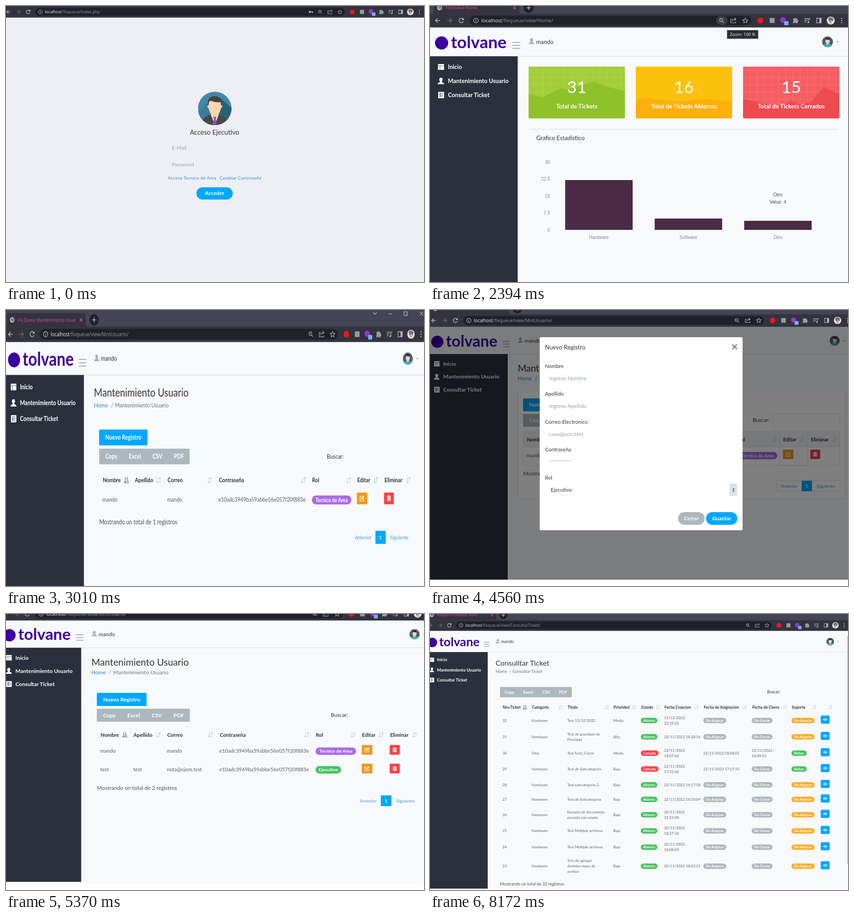
An HTML page for the animation above (9.12 s loop, 920 by 609 pixels).

```html
<!DOCTYPE html>
<html lang="es">
<head>
<meta charset="utf-8">
<title>Mesa de soporte</title>
<style>
html, body { margin: 0; width: 100%; height: 100%; overflow: hidden; background: #fff; }
#stage { position: relative; width: 920px; height: 609px; overflow: hidden; }
#film { display: block; font-family: Lato, "Open Sans", sans-serif; animation: cuts 9120ms step-end infinite; }
.ui { font-family: "Open Sans", "Noto Sans", sans-serif; }
.chart { font-family: "Liberation Sans", Arial, sans-serif; }
@keyframes cuts {
  0% { transform: translateY(0); }
  16.118% { transform: translateY(-609px); }
  33.004% { transform: translateY(-1218px); }
  50% { transform: translateY(-1827px); }
  58.881% { transform: translateY(-2436px); }
  74.013% { transform: translateY(-3045px); }
  100% { transform: translateY(-3045px); }
}
</style>
</head>
<body>
<div id="stage"><svg id="film" width="920" height="3654"></svg></div>
<script>
const BLUE = '#00a8ff', GREY = '#adb7be', GREEN = '#46c35f', RED = '#fa424a', ORANGE = '#fdad2a';
const INK = '#343434', SOFT = '#5d6063', PAGE = '#f7f9fb', LINE = '#d3dfe5';

// Drawing helpers; text is placed by the middle of its capitals.
const text = (x, y, s, size, fill = INK, weight = 400, anchor = 'start', extra = '') =>
  `<text x="${x}" y="${y + size * .36}" font-size="${size}" fill="${fill}" font-weight="${weight}" text-anchor="${anchor}" ${extra}>${s}</text>`;
const mid = (x, y, s, size, fill, weight) => text(x, y, s, size, fill, weight, 'middle');
const ui = (x, y, s, size, fill) => text(x, y, s, size, fill, 400, 'start', 'class="ui"');
const rect = (x, y, w, h, fill, r = 0, extra = '') =>
  `<rect x="${x}" y="${y}" width="${w}" height="${h}" fill="${fill}" rx="${r}" ${extra}/>`;
const box = (x, y, w, h) => rect(x, y, w, h, 'none', 1, `stroke="${LINE}"`);
const disc = (x, y, r, fill) => `<circle cx="${x}" cy="${y}" r="${r}" fill="${fill}"/>`;
const shape = (d, fill) => `<path d="${d}" fill="${fill}"/>`;
const stroke = (d, color, w = 1.5) => `<path d="${d}" fill="none" stroke="${color}" stroke-width="${w}"/>`;
const at = (x, y, inner, sx = 1, sy = sx) => `<g transform="translate(${x} ${y}) scale(${sx} ${sy})">${inner}</g>`;
const pill = (x, y, w, h, fill, s, size) =>
  rect(x, y - h / 2, w, h, fill, h / 2) + mid(x + w / 2, y, s, size, '#fff', 700);

// Icons
const person = (x, y, c, s = 1) => at(x, y, `<ellipse cy="-3" rx="3.6" ry="4.2" fill="${c}"/>` +
  shape('M-7 7Q-7 3.5 -2 2.5V0H2V2.5Q7 3.5 7 7Z', c), s);
const sort = (x, y, s = 1, active) => at(x, y, active
  ? stroke('M-3 -6V5.500M-5.500 3L-3 5.500L-.5 3M0 -5H3M0 -2H4M0 1.500H5M0 5H6', '#6c757d', 1.5)
  : stroke('M-2.500 -5.500V5.500M-5 3L-2.500 5.500L0 3M3 5.500V-5.500M.5 -3L3 -5.500L5.500 -3', '#c3cad0', 1.1), s);
const editBtn = (x, y) => rect(x, y - 11.5, 25, 23, '#f29824', 2) + at(x + 12.5, y,
  stroke('M2 -4H-5V5H4V1', '#fff', 1.2) + stroke('M-2 2L5 -4', '#fff', 2.4));
const trashBtn = (x, y) => rect(x, y - 11.5, 23.5, 23, RED, 2) + at(x + 11.7, y,
  shape('M-4 -2H4V5H-4ZM-5 -4H5V-2.8H-5ZM-2 -5.5H2V-4H-2Z', '#fff') + stroke('M-1.5 -.5V3.5M1.5 -.5V3.5', RED, .9));
const eyeBtn = y => rect(860, y - 9, 19.5, 18, BLUE, 2) + at(869.7, y,
  shape('M-4.5 0Q0 -5 4.5 0Q0 5 -4.5 0Z', '#fff') + disc(0, 0, 1.5, BLUE));
const bust = (x, y, r, bg, coat, hair, suit) => at(x, y, `<g clip-path="url(#round)">` + disc(0, 0, 37, bg) +
  (suit ? shape('M-15 -13L-40 12V40H0ZM12 -24L40 2V40H0Z', '#2b6278') + shape('M-15 -13L-40 12V40H0Z', '#3a7c99') : '') +
  shape('M-31 40Q-31 20 -9 13H9Q31 20 31 40Z', coat) + shape('M-9 13L0 36L9 13Z', suit ? '#f4f6f8' : coat) +
  rect(-6, 4, 12, 15, '#f2c499', 4) + disc(-13.5, -4, 3, '#fdd2a6') + disc(13.5, -4, 3, '#fdd2a6') +
  shape('M-13.5 -16H13.5V0Q10 16 0 17Q-10 16 -13.5 0Z', '#fdd7ad') +
  shape('M-15 -5Q-18 -25 -3 -27Q18 -28 15 -5L12.500 -14Q0 -12 -8 -18Q-13 -16 -13 -12Z', hair) +
  (suit ? shape('M-4 19H4L2 24L5 40H-5L-2 24Z', '#9b4fa5') : '') + '</g>', r / 37);

// Browser bar: left icons start at b, extensions start at r.
function browser(b, r, cy, sx, sy, path, title, opts = {}) {
  const c = '#b9bac3', dim = '#6b6c76', dark = '#20212a', bar = '#33343e';
  const tab = rect(-40, -70, 1300, 56, '#454556') + shape('M-14 -14.7Q-9 -14.7 -9 -20V-36Q-9 -41 -4 -41H174Q180 -41 180 -36V-20Q180 -14.7 186 -14.7Z', bar) +
    disc(4, -28, 5.5, c) + stroke('M1 -31L4 -29L2 -26M6 -32L7 -28L5 -25', bar, 1.3) +
    ui(17.5, -28, title, 9.2, '#f0439f') + stroke('M166 -31L172 -25M172 -31L166 -25', '#f0439f', 1.4) +
    disc(200, -28, 11, dark) + stroke('M195 -28H205M200 -33V-23', c);
  const left = stroke('M5 0H-5M0 -5L-5 0L0 5', c) + stroke('M21 0H31M26 -5L31 0L26 5', dim) +
    stroke('M56 -3A5 5 0 1 0 56.500 2', c) + shape('M57.500 -6V-1H52.500Z', c) +
    `<circle cx="84" r="5.2" fill="none" stroke="${c}" stroke-width="1.2"/>` + stroke('M84 -.5V3M84 -3V-1.6', c, 1.3) +
    ui(96, 0, `<tspan fill="#f1f1f4">localhost</tspan>/fixqueue/${path}`, 10.8, '#9697a1');
  const right = (opts.key ? disc(-113, 0, 2.8, c) + stroke('M-111 0H-104M-106 0V3', c, 2) : '') +
    (opts.lens ? rect(-97, -9.5, 25, 19, '#3d3e49', 9.5) : '') +
    `<circle cx="-86" cy="-1" r="3.6" fill="none" stroke="${c}" stroke-width="1.2"/>` + stroke('M-83 2L-80 5M-87.500 -1H-84.500', c, 1.2) +
    stroke('M-61 -3H-65V5H-54V2M-62 2Q-61 -3 -54 -3M-57 -6L-53.500 -3L-57 0', c, 1.1) +
    stroke('M-33 -5.500L-31.300 -1.800L-27.300 -1.400L-30.300 1.300L-29.400 5.200L-33 3.100L-36.600 5.200L-35.700 1.300L-38.700 -1.400L-34.700 -1.800Z', c, 1.1) +
    disc(0, 0, 6.5, '#f0171c') + rect(20.5, -5.5, 11, 11, '#9a9b9f') +
    disc(50, -1, 6.2, '#8f35d6') + rect(52.5, 1.5, 9.5, 9, '#78aef8', 1.5) +
    shape('M72 -4H75A2 2 0 0 1 79 -4H82V-.5A2 2 0 0 1 82 3.500V6H78A2 2 0 0 0 74.500 6H72V2A2 2 0 0 0 72 -1.500Z', '#9a9ba4') +
    stroke('M97 -4H106M97 -.5H104M97 3H101M107 4V-4H110', c, 1.3) + disc(105.5, 4, 1.8, c) +
    stroke('M124 -5H134V5H124Z', c, 1.3) + rect(130, -5, 4, 10, c) +
    disc(155, 0, 8.8, '#e9e7e5') + shape('M149 -4Q155 -11 161 -4L160 2L156 0L152 3Z', '#77736f') + disc(155, 4, 3, '#c9a693') +
    [-4.5, 0, 4.5].map(y => disc(179, y, 1.3, c)).join('');
  const x = b + 70 * sx, h = 21 * sy;
  return at(b, cy, tab + rect(-40, -14.7, 1300, 30, bar), sx, sy) +
    rect(x, cy - h / 2, r - 20 * sx - x, h, dark, h / 2) + at(b, cy, left, sx, sy) + at(r, cy, right, sx, sy);
}

// Shared site frame, in its own units; ax is the avatar's place.
function site(x, y, sx, sy, ax, body) {
  const items = ['Inicio', 'Mantenimiento Usuario', 'Consultar Ticket'];
  const icons = rect(17.5, 81.5, 13.5, 13, '#fff', 1) + stroke('M17.500 85.500H31M22 86V94.500', '#2b303c', .8) +
    person(24, 119, '#fff') + rect(18, 143, 13, 14, '#fff', 1) +
    stroke('M20 146.500H29M20 149.500H29M20 152.500H29M22.500 145V155', '#2b303c', .8);
  return at(x, y, rect(0, 0, 1300, 900, PAGE) + rect(0, 64, 1300, 1, '#cfdde4') +
    disc(25.5, 35, 14.5, '#3c00a0') + text(46, 33, 'tolvane', 37, '#3c00a0', 700) +
    stroke('M181 34H198.500M181 40.500H198.500M181 47H198.500', '#a5b1b9', 2) +
    person(223.5, 31, '#a3b1ba', .9) + text(233.5, 32.5, 'mando', 12.8) +
    bust(ax, 32.5, 12, '#4c6072', '#35b3bd', '#23262c') + shape(`M${ax + 20} 31.500H${ax + 26}L${ax + 23} 34.500Z`, '#a5adb5') +
    rect(0, 64.5, 193, 850, '#2b303c') + icons +
    items.map((s, i) => text(39.5, 88 + i * 31, s, 12.7, '#fff', 700)).join('') + body, sx, sy);
}

const exportBar = (x, y, w, h, centers, size) => rect(x, y, w, h, GREY, 2) +
  ['Copy', 'Excel', 'CSV', 'PDF'].map((s, i) => mid(centers[i], y + h / 2, s, size, '#fff', 700)).join('');

function login() {
  return rect(0, 0, 920, 609, '#eeeff5') + bust(459.5, 226, 37, '#4389a8', '#484848', '#444', true) +
    mid(459, 279, 'Acceso Ejecutivo', 14.6) + text(365, 313, 'E-Mail', 11.3, '#9aa5ad') +
    text(365, 350, 'Password', 11.6, '#9aa5ad') +
    text(356, 380, 'Acceso Tecnico de Area', 9.5, '#2a8cc9', 400, 'start', 'letter-spacing=".43"') +
    text(470, 380, 'Cambiar Contraseña', 9.5, '#2a8cc9', 400, 'start', 'letter-spacing=".43"') +
    rect(419, 400, 80, 27, BLUE, 13.5) + mid(459, 413, 'Acceder', 11.7, '#fff', 700) +
    browser(6, 762, 13, .826, .826, 'index.php', '', { key: true });
}

function home() {
  const card = (x, n, label, top, low, grid, area) => {
    let lines = '';
    if (grid) for (let i = 1; i < 14; i++) lines += `M${i * 15.7} 0V114M0 ${i * 16 - 8}H212`;
    return at(x, 87, `<g clip-path="url(#card)">` + rect(0, 0, 212, 114.5, top) + stroke(lines, 'rgba(255,255,255,.13)', 1) +
      shape(`M0 115L${area}V115Z`, low) + '</g>' +
      mid(106, 45.5, n, 37, '#fff', 400) + mid(106, 87.5, label, 13.2, '#fff', 700));
  };
  const chart = (x, y, s, size, c, a) => text(x, y, s, size, c, 400, a, 'class="chart"');
  const bars = [['Hardware', 22], ['Software', 5], ['Otro', 4]].map(([s, v], i) =>
    rect(297.5 + i * 197, 447.5 - v * 5, 148.5, v * 5, '#4b2a46') + chart(371.7 + i * 197, 463.5, s, 10, '#85878a', 'middle')).join('');
  const axis = [30, 22.5, 15, 7.5, 0].map(v => chart(264, 447.5 - v * 5, v, 10, '#85878a', 'end')).join('');
  return site(0, 46.5, 1, 1, 875,
    card(217, 31, 'Total de Tickets', '#a3cd39', '#8fc229', true, '0 60L30 68L71 48L85 51L143 33L178 46L212 54') +
    card(453, 16, 'Total de Tickets Abiertos', '#fcc10c', '#fdaf0c', false, '0 73L27 69L75 76L97 78L147 71L185 76L212 76') +
    card(689, 15, 'Total de Tickets Cerrados', '#f65d62', '#ef4a4f', true, '0 72L31 78L71 88L91 82L106 76L126 83L149 79L178 45L196 54L212 60') +
    rect(219, 225, 679, 1, '#c8dde6') + text(234, 245, 'Grafico Estadístico', 13) + axis + bars +
    chart(765.5, 370, 'Otro', 10.3, '#4c4f52', 'middle') + chart(765.5, 386, 'Value: 4', 10.3, '#4c4f52', 'middle')) +
    browser(17, 727, 32, 1, 1, 'view/Home/', 'FixQueue Home', { lens: true }) +
    rect(654, 53.5, 68, 18.5, '#2a2b33', 0, 'stroke="#62636b"') + ui(660, 63, 'Zoom: 100 %', 9.3, '#fff');
}

function users(rows, framed) {
  const heads = [['Nombre', 238.3, 295], ['Apellido', 315.3, 372.7], ['Correo', 393.7, 494.7], ['Contraseña', 516.7, 719.5],
    ['Rol', 740.5, 827.7], ['Editar', 848.5, 893], ['Eliminar', 914, 971]];
  const end = 351.5 + (rows.length - 1) * 44, foot = end + 30;
  return (framed ? rect(217.8, 155.8, 778, 256, '#fff', 2, `stroke="${LINE}"`) + rect(229.7, 250.5, 753, 37, '#f1f4f7') +
      box(229.7, 250.5, 753, 81.5) + box(840.5, 250.5, 66, 81.5) + box(824.3, 208, 159, 30.5) +
      rect(229.7, 287, 753, 1, LINE) + box(833, foot - 13, 150, 26) : '') +
    text(217, 98.5, 'Mantenimiento Usuario', 22) + text(217, 123, 'Home', 12.6, '#2d82c4') +
    text(257.5, 123, '/', 12.5, '#7a8288') + text(267.5, 123, 'Mantenimiento Usuario', 12.5, '#6c757d') +
    rect(229.5, 171, 116, 31, BLUE, 2) + mid(287.5, 186.5, 'Nuevo Registro', 12.7, '#fff', 700) +
    exportBar(229.5, 208.3, 217, 30.7, [258.8, 315.5, 369.5, 421], 12.7) + text(775.7, 223.3, 'Buscar:', 12.5) +
    heads.map(([s, x, sx], i) => text(x, 270, s, 11.9, INK, 700) + sort(sx, 270, 1, !i)).join('') +
    rows.map(([name, last, mail, role, w, c], i) => {
      const y = 308 + i * 44;
      return text(237.3, y, name, 12, SOFT) + text(314.5, y, last, 12, SOFT) + text(392.8, y, mail, 12, SOFT) +
        text(515.5, y, 'e10adc3949ba59abbe56e057f20f883e', 12, SOFT) + pill(740, y + .5, w, 17.5, c, role, 11) +
        editBtn(847.8, y - 2.5) + trashBtn(913, y - 2.5);
    }).join('') +
    text(229.7, end, `Mostrando un total de ${rows.length} registros`, 12.8, '#4c4f52') +
    mid(863, foot, 'Anterior', 10.8, '#3f9fe0') + rect(892.3, foot - 12.7, 24.7, 25.4, BLUE) +
    mid(904.6, foot, '1', 10.5, '#fff', 700) + mid(949.6, foot, 'Siguiente', 10.8, '#3f9fe0');
}
const boss = ['mando', '', 'mando', 'Tecnico de Area', 94.5, '#ac6ae8'];
const guest = ['test', 'test', 'nota@ejem.test', 'Ejecutivo', 59.5, GREEN];
const usersTitle = 'Fix Queue Mantenimiento Usuar';

function userList() {
  return site(-5.6, 70.5, .9175, 1.13, 970, users([boss])) +
    browser(10, 749, 53.4, .9185, 1.13, 'view/MntUsuario/', usersTitle) +
    stroke('M808 5L812 9.500L816 5M842 8.500H850M876 4H883V12H876ZM911 4L918 12M918 4L911 12', '#d4d4dc', 1.1);
}

function userForm() {
  const fields = [['Nombre', 'Ingrese Nombre'], ['Apellido', 'Ingrese Apellido'], ['Correo Electronico', 'caso@uno.test'], ['Contraseña', '']];
  return site(-7.5, 38, .925, .918, 971, users([boss], true)) + rect(0, 0, 920, 609, 'rgba(0,0,0,.5)') +
    browser(8, 754, 23, .9225, .918, 'view/MntUsuario/', usersTitle) +
    rect(241.5, 60, 446.5, 426, '#fff', 3) + text(253, 82, 'Nuevo Registro', 13.2) +
    stroke('M665.500 76L675.500 86M675.500 76L665.500 86', '#858585', 2.6) +
    fields.map(([s, hint], i) => text(253, 123.5 + i * 61.5, s, 11.5) + text(262.5, 150.5 + i * 61.5, hint, 11.7, '#919fa9')).join('') +
    text(263, 334.5, '*'.repeat(12), 10, '#919fa9') + text(253, 369.5, 'Rol', 11.5) + text(265.5, 396.5, 'Ejecutivo', 11.6) +
    rect(659, 383, 17, 27, '#dbe1ea', 1) + shape('M665.500 396L668 392.500L670.500 396ZM665.500 398L668 401.500L670.500 398Z', '#4b5560') +
    pill(546, 460, 58.5, 28, GREY, 'Cerrar', 11.6) + pill(607.5, 460, 69, 28, BLUE, 'Guardar', 11.6) +
    rect(0, 595, 920, 14, '#fff');
}

function userAdded() {
  return site(-16.5, 14.2, .943, .935, 971, users([boss, guest])) +
    browser(-2, 760, 0, .942, .935, 'view/MntUsuario/', '') +
    rect(0, 591, 166, 4, PAGE) + rect(0, 595, 920, 14, '#fff');
}

function tickets() {
  const heads = [['Nro.Ticket', 160, 209], ['Categoria', 224.5, 287], ['Titulo', 303, 389], ['Prioridad', 404, 449], ['Estado', 465, 501],
    ['Fecha Creacion', 516, 587], ['Fecha de Asignacion', 602.5, 693], ['Fecha de Cierre', 709.5, 781], ['Soporte', 796, 846], ['', 0, 881]];
  const rows = [
    [235, 'Test 13/12/2022', 'Media', '13/12/2022|22:39:22'],
    [271, 'Test de guardado de|Prioridad', 'Alta', '22/11/2022 18:28:16'],
    [307, 'Test Fech_Cierre', 'Media', '22/11/2022|18:07:42', '22/11/2022 18:08:01', '22/11/2022|18:09:53'],
    [342, 'Test de Subcategoria', 'Baja', '22/11/2022|17:25:06', '22/11/2022 17:27:55'],
    [377, 'Test subcategoria 2', 'Baja', '22/11/2022 16:17:58'],
    [409, 'Test de Subcategoria', 'Baja', '22/11/2022 16:10:09'],
    [443, 'Ejemplo de documento|enviado con empty', 'Baja', '20/11/2022|21:55:00'],
    [478.5, 'Test Multiple archivos', 'Baja', '20/11/2022|18:37:54'],
    [514.5, 'Test Multiple archivos', 'Baja', '20/11/2022|18:08:45'],
    [556.5, 'Test de agregar|distintos tipos de|archivo', 'Baja', '20/11/2022 18:03:21']];
  const cell = (x, y, s) => String(s).split('|').map((p, i, all) => text(x, y + (i - (all.length - 1) / 2) * 12, p, 8.2, SOFT)).join('');
  const body = rows.map(([y, title, level, made, taken, closed], i) =>
    cell(159.5, y, 32 - i) + cell(223.8, y, i === 2 ? 'Otro' : 'Hardware') + cell(302, y, title) + cell(403.5, y, level) +
    (taken ? pill(464, y, 39, 12, RED, 'Cerrado', 7.9) : pill(464, y, 36.5, 12, GREEN, 'Abierto', 7.9)) + cell(515.3, y, made) +
    (taken ? cell(601.3, y, taken) : pill(601.5, y, 50.5, 12, GREY, 'Sin Asignar', 8)) +
    (closed ? cell(708, y, closed) : pill(708, y, 46, 12, GREY, 'Sin Cerrar', 8)) +
    (taken ? pill(795.5, y, 33.5, 12, GREEN, 'Relian', 8) : pill(795.5, y, 51, 12, ORANGE, 'Sin Asignar', 8)) + eyeBtn(y - 2)).join('');
  return site(-13.3, 37.6, .727, .72, 1230, '') +
    text(144.5, 108.5, 'Consulltar Ticket', 16.1) + text(144.5, 126.5, 'Home', 9.2, '#2d82c4') +
    text(174, 126.5, '/', 9.2, '#7a8288') + text(181.5, 126.5, 'Consultar Ticket', 9.3, '#6c757d') +
    exportBar(154, 161, 158, 23, [175, 216, 256, 293], 9.3) + text(742, 172, 'Buscar:', 9) +
    heads.map(([s, x, sx], i) => text(x, 205.5, s, 8.6, INK, 700) + sort(sx, 206, .78, !i)).join('') + body +
    text(154, 596, 'Mostrando un total de 32 registros', 9.3, '#4c4f52') + rect(919, 48, 1, 504, '#8a8d91') +
    browser(1, 768, 25, .802, .8, 'view/ConsultarTicket/', 'FixQueue Consultar Ticket') +
    rect(0, 606, 920, 3, '#fff');
}

document.getElementById('film').innerHTML =
  '<defs><clipPath id="round"><circle r="37"/></clipPath><clipPath id="card"><rect width="212" height="114.5" rx="3"/></clipPath></defs>' +
  [login, home, userList, userForm, userAdded, tickets].map((scene, i) =>
    `<svg y="${i * 609}" width="920" height="609" overflow="hidden">${scene()}</svg>`).join('');
</script>
</body>
</html>
```
